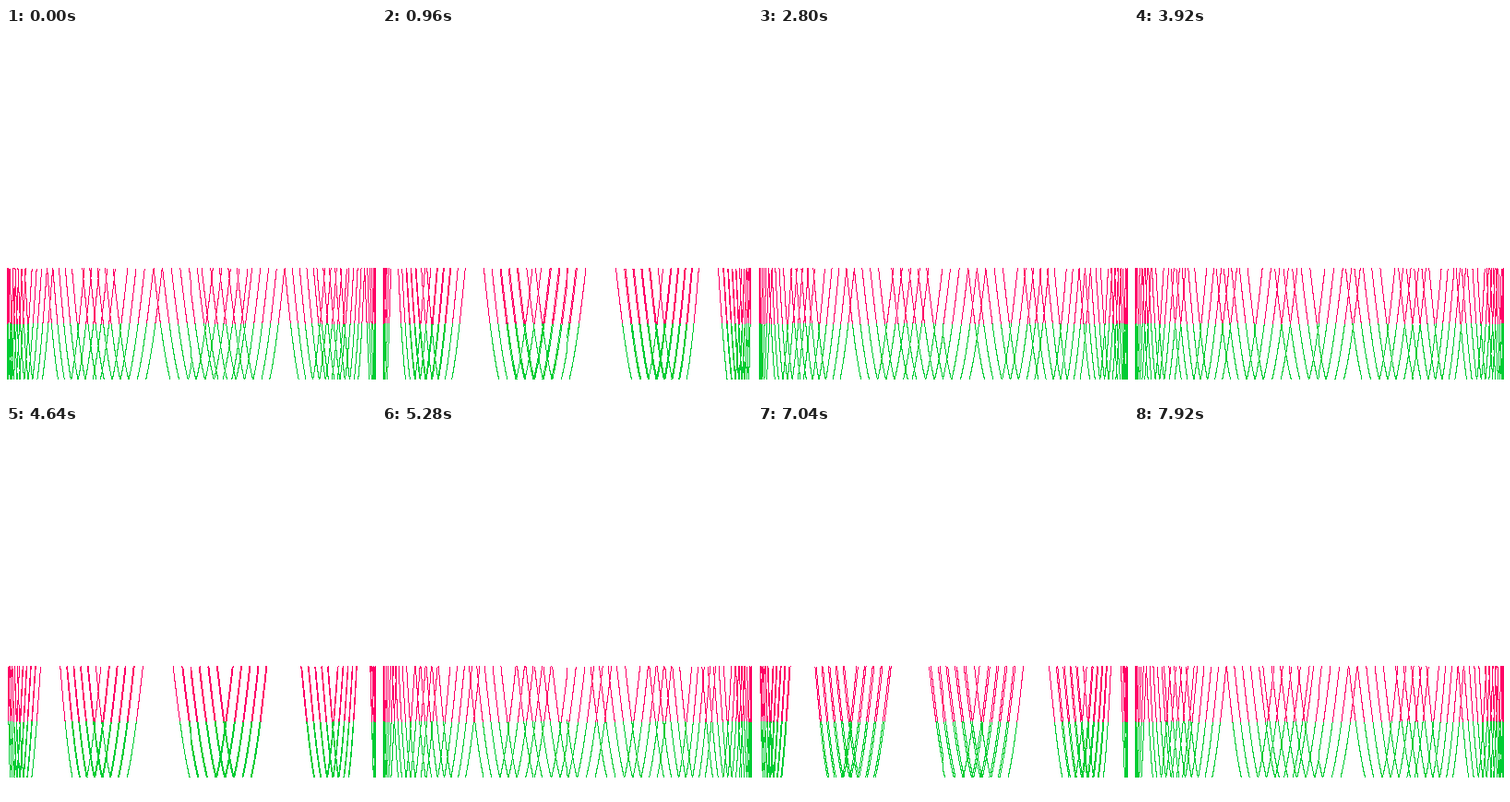
Animation of 401x401 px, one loop 8 s. Source, as an HTML page with a canvas:

```html
<!DOCTYPE html>
<html lang="en">
<head>
<meta charset="utf-8">
<title>Lissajous bands</title>
<style>
  html, body { margin: 0; width: 100%; height: 100%; overflow: hidden; background: #fff; }
  canvas { display: block; width: 401px; height: 401px; image-rendering: pixelated; }
</style>
</head>
<body>
<canvas id="stage" width="401" height="401"></canvas>
<script>
const R = 200, W = 2 * R + 1;
const TURNS = 5, STEP = 0.0004, FREQ = 9.0699043;
const DELAY = 80, FRAMES = 100, PHASE_STEP = 0.2;

const ctx = document.getElementById('stage').getContext('2d');
const img = ctx.createImageData(W, W);
const px = new Uint32Array(img.data.buffer);

// Colours as 0xAABBGGRR
const WHITE = 0xffffffff, PINK = 0xff6600ff, GREEN = 0xff33cc00;

const toPixel = v => R + Math.trunc(v * R + 0.5);

// Only two bands of the curve are inked; the rest stays white.
function draw(phase) {
  px.fill(WHITE);
  const end = TURNS * 2 * Math.PI;
  for (let t = 0; t < end; t += STEP) {
    const y = Math.sin(t * FREQ + phase);
    if (y < 0.3 || y > 0.9) continue;
    px[toPixel(y) * W + toPixel(Math.sin(t))] = y < 0.6 ? PINK : GREEN;
  }
  ctx.putImageData(img, 0, 0);
}

let shown = -1;
function tick() {
  const n = Math.floor(performance.now() / DELAY) % FRAMES;
  if (n !== shown) {
    shown = n;
    draw(n * PHASE_STEP);
  }
  requestAnimationFrame(tick);
}
tick();
</script>
</body>
</html>
```
